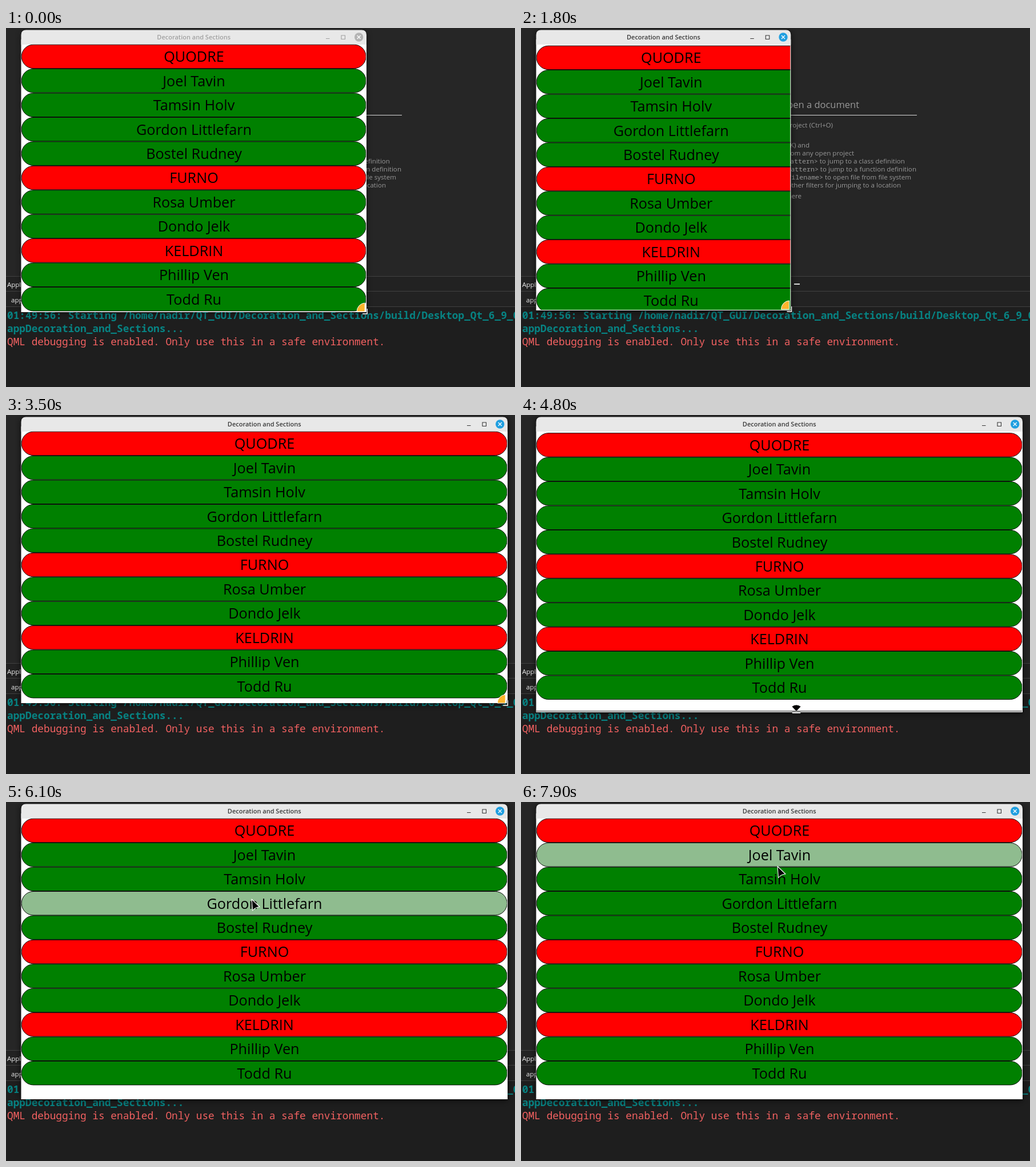
Write an HTML page that moves like this. It is 891 by 628 pixels and loops after 8000 ms.

```html
<!DOCTYPE html>
<html lang="en">
<head>
<meta charset="utf-8">
<title>Decoration and Sections</title>
<style>
html, body { margin: 0; width: 100%; height: 100%; overflow: hidden; background: #262626; }
svg { display: block; width: 891px; height: 628px; font-family: "Open Sans", "Noto Sans", sans-serif; }
text { white-space: pre; }
.mono { font-family: "Noto Sans Mono", "DejaVu Sans Mono", monospace; }
.log { font-size: 17.8px; }
.hint { font-size: 11.6px; fill: #989898; text-anchor: end; }
.row { font-size: 25.2px; text-anchor: middle; }
</style>
</head>
<body>
<svg viewBox="0 0 891 628">
  <defs>
    <filter id="blur" x="-10%" y="-10%" width="120%" height="120%"><feGaussianBlur stdDeviation="5"/></filter>
    <clipPath id="inside"><rect id="clip" x="26.5" y="28.5"/></clipPath>
  </defs>
  <rect width="891" height="628" fill="#262626"/>
  <g id="hints">
    <text class="hint" x="592" y="139.5" style="font-size:16.5px">Open a document</text>
    <path d="M240 152.5H693" stroke="#d8d8d8"/>
  </g>
  <rect y="434" width="891" height="54" fill="#222"/>
  <rect y="488" width="891" height="140" fill="#1e1e1e"/>
  <path d="M0 434.5H891M0 460.5H891M0 487.5H891" stroke="#414141"/>
  <g font-size="11.5" fill="#eee">
    <text x="2" y="452.5">Application Output</text>
    <text x="9" y="480">appDecoration_and_Sections</text>
  </g>
  <path d="M478 448H488" stroke="#ddd" stroke-width="2"/>
  <g class="mono log">
    <g font-weight="700" fill="#078383">
      <text x="2" y="509">01:49:56: Starting /home/nadir/QT_GUI/Decoration_and_Sections/build/Desktop_Qt_6_9_0</text>
      <text x="2" y="532">appDecoration_and_Sections...</text>
    </g>
    <text x="2" y="555" fill="#f26161">QML debugging is enabled. Only use this in a safe environment.</text>
  </g>

  <rect id="shadow" x="25" y="5" rx="8" filter="url(#blur)"/>
  <rect id="body" x="26.5" y="20" fill="#fff"/>
  <path id="bar" fill="#e8e8e8"/>
  <text id="title" y="20.3" font-size="11" font-weight="600" text-anchor="middle">Decoration and Sections</text>
  <g id="buttons">
    <path id="icons" d="M-71 18.5h6.5M-44 13h6.5v6.5h-6.5z" fill="none" stroke-width="1.1"/>
    <circle id="close" cx="-13.3" cy="16" r="7.7"/>
    <path d="M-16.3 13l6 6m0-6l-6 6" stroke="#fff" stroke-width="1.3"/>
  </g>
  <g clip-path="url(#inside)">
    <g id="list"></g>
    <rect id="gap" y="29"/>
    <rect id="stripe" y="29" width="1" fill="#999"/>
    <rect id="lip" x="26" height="3" fill="#888"/>
  </g>

  <g id="corner">
    <path d="M0-9V0H-8" fill="none" stroke="#222" stroke-width="3"/>
    <path d="M0-9V0H-8" fill="none" stroke="#fff" stroke-width="1.4"/>
    <path d="M-18-4A15 15 0 0 1-4-19V-4Z" fill="#fcb52c" stroke="#fff"/>
  </g>
  <g id="edge">
    <path d="M-8-8.5Q0-14.5 8-8.5L0 0Z" stroke="#fff" stroke-width=".7"/>
    <rect x="-7.5" y="1" width="15" height="2.6" rx="1" fill="#fff" stroke="#222" stroke-width=".6"/>
  </g>
  <path id="arrow" d="M0 0L14 13.5Q6 14 1.5 20Z" stroke="#fff" stroke-width="1.1" stroke-linejoin="round"/>
</svg>
<script>
const NS = 'http://www.w3.org/2000/svg';
const $ = id => document.getElementById(id);
const set = (el, attrs) => { for (const k in attrs) el.setAttribute(k, attrs[k]); return el; };
const add = (parent, tag, attrs) => parent.appendChild(set(document.createElementNS(NS, tag), attrs));
const show = (el, on) => set(el, { visibility: on ? 'visible' : 'hidden' });
const move = (el, x, y) => set(el, { transform: `translate(${x} ${y})` });

// Progress of a move between the times a and b.
const ramp = (t, a, b) => Math.min(1, Math.max(0, (t - a) / (b - a)));
const wave = (t, a, b) => (1 - Math.cos(Math.PI * ramp(t, a, b))) / 2;
const brake = (t, a, b, power) => 1 - (1 - ramp(t, a, b)) ** power;
const hump = (t, a, b) => Math.sin(Math.PI * ramp(t, a, b));

const LOOP = 8000, STEP = 100, LEFT = 26.5, TOP = 28.7, PITCH = 42.43;
const names = ['QUODRE', 'Joel Tavin', 'Tamsin Holv', 'Gordon Littlefarn', 'Bostel Rudney',
  'FURNO', 'Rosa Umber', 'Dondo Jelk', 'KELDRIN', 'Phillip Ven', 'Todd Ru'];

// Dragged out, in, out again, then nudged into place.
const rightAt = t => 631 + 243 * wave(t, 500, 1250) - 412 * brake(t, 1340, 1990, 3)
  + 422 * wave(t, 1900, 2270) - 6 * ramp(t, 2600, 2800);
const bottomAt = t => 497 - 3 * ramp(t, 1400, 1800) + 9 * ramp(t, 1900, 2300)
  + ramp(t, 2600, 2800) + 16 * ramp(t, 4600, 4800);
const bounceAt = t => 2 * hump(t, 1400, 2200) + 2.5 * hump(t, 4600, 5000);

// Along the bottom edge, up through the rows, then back down a little.
const pointerX = t => 870 - 398 * wave(t, 3500, 4200) + 10 * ramp(t, 4200, 4300)
  - 52 * wave(t, 5000, 6100) + 19 * brake(t, 6100, 7000, 2);
const pointerY = t => 508 + 8 * hump(t, 3500, 4200) + 10 * ramp(t, 4600, 4800) - 92 * wave(t, 5000, 5300)
  - 256 * wave(t, 5400, 6100) - 123 * brake(t, 6100, 7000, 2) + 65.5 * wave(t, 7600, 7900);

function hint(y, x, text, code = '') {
  const line = add($('hints'), 'text', { class: 'hint', x, y });
  if (code) {
    line.append('- type ');
    add(line, 'tspan', { class: 'mono' }).textContent = code;
  }
  line.append(text);
}
hint(173.6, 546, 'File > Open File or Project (Ctrl+O)');
hint(209, 505, 'Locate (Ctrl+K) and');
[
  [583, '- type to open file from any open project'],
  [672, ' to jump to a class definition', 'c<space><pattern>'],
  [692, ' to jump to a function definition', 'm<space><pattern>'],
  [683, ' to open file from file system', 'f<space><filename>'],
  [665, '- select one of the other filters for jumping to a location'],
].forEach((args, i) => hint(222.6 + i * 14.2, ...args));
hint(297.6, 491, 'Drag and drop files here');

const rows = names.map((name, i) => {
  const y = TOP + i * PITCH;
  const base = name === name.toUpperCase() ? '#ff0000' : '#008000';
  const pill = add($('list'), 'rect', { x: 27.2, y: y + .45, height: PITCH - .9, rx: 20.8, stroke: '#000', 'stroke-width': .95 });
  const label = add($('list'), 'text', { class: 'row', y: y + 30.6 });
  label.textContent = name;
  return { pill, label, base };
});

function drawFrame(t, right, bottom) {
  const width = right - LEFT, active = t >= 600;
  const ink = active ? '#383838' : '#a0a0a0';
  set($('shadow'), { width: width + 3, height: bottom - 2, opacity: active ? .55 : .35 });
  set($('body'), { width, height: bottom - 20 });
  set($('clip'), { width: width - 1, height: bottom - 29.5 });
  set($('bar'), { d: `M${LEFT} 29V12q0-8.5 8.5-8.5H${right - 8.5}q8.5 0 8.5 8.5V29Z` });
  set($('title'), { x: (LEFT + right) / 2, fill: ink });
  set($('icons'), { stroke: ink });
  set($('close'), { fill: active ? '#209fe0' : '#b4b4b4' });
  move($('buttons'), right, 0);
}

// The content trails the window by one step.
function drawList(t, right, bottom, hover) {
  const listRight = rightAt(t - STEP);
  const strip = Math.min(9, Math.max(0, right - listRight) * .41);
  set($('gap'), { x: right - strip, width: strip, height: bottom });
  set($('stripe'), { x: right - strip * .6, height: bottom });
  show($('stripe'), strip > 2);
  set($('lip'), { y: bottom - 3, width: right });
  show($('lip'), bottom - bottomAt(t - STEP) > 5);
  move($('list'), 0, bounceAt(t));
  rows.forEach(({ pill, label, base }, i) => {
    set(pill, { width: listRight - 28.1, fill: i === hover ? '#8fbc8f' : base });
    set(label, { x: (27 + listRight) / 2 });
  });
}

function drawPointer(t, right, bottom) {
  const x = pointerX(t), y = pointerY(t);
  const kind = t <= 3500 ? 'corner' : t >= 4300 && t <= 5000 ? 'edge' : 'arrow';
  for (const id of ['corner', 'edge', 'arrow']) show($(id), id === kind);
  move($('corner'), right + 1.2 - ramp(t, 2300, 2700), bottom + 3 - ramp(t, 0, 300) + 2 * ramp(t, 2000, 2700));
  move($('edge'), x, bottom - 1.5);
  move($('arrow'), x, y);
  return t > 5000 ? Math.floor((y - TOP - bounceAt(t)) / PITCH) : -1;
}

function draw(time) {
  const t = Math.floor(time / STEP) * STEP;
  const right = rightAt(t), bottom = bottomAt(t);
  drawFrame(t, right, bottom);
  drawList(t, right, bottom, drawPointer(t, right, bottom));
}

const start = performance.now();
function tick() {
  draw((performance.now() - start) % LOOP);
  requestAnimationFrame(tick);
}
tick();
</script>
</body>
</html>
```
